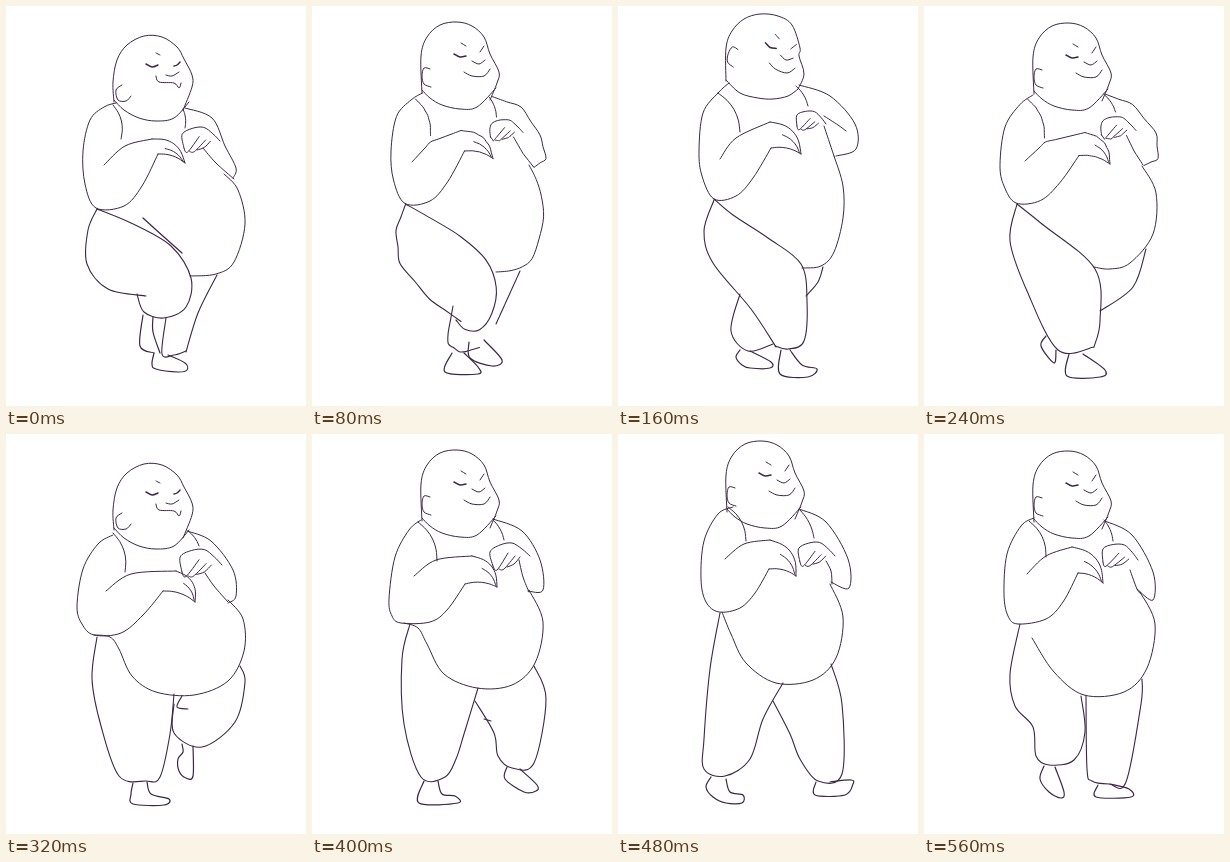
Recreate the animation shown at these times as an HTML page with a canvas. Size 300 px wide and 400 px high, loop 640 ms.

```html
<!DOCTYPE html>
<html lang="en">
<head>
<meta charset="utf-8">
<title>Walk cycle</title>
<style>
html, body { margin: 0; width: 100%; height: 100%; overflow: hidden; background: #fff; }
canvas { display: block; width: 300px; height: 400px; }
</style>
</head>
<body>
<canvas id="stage" width="300" height="400"></canvas>
<script>
const ctx = document.getElementById("stage").getContext("2d");
const STEP = 80;
const INK = "#3c2647";

// Strokes are separated by "/", each one a run of x,y points.
const strokes = text => text.split("/").map(run =>
  run.trim().split(/\s+/).map(point => point.split(",").map(Number)));

// Curve from a to b, bulging by a share of its length.
const arc = (a, b, bow) => {
  const dx = b[0] - a[0], dy = b[1] - a[1];
  return [0, .25, .5, .75, 1].map(u => {
    const k = 4 * u * (1 - u) * bow;
    return [a[0] + dx * u + dy * k, a[1] + dy * u - dx * k];
  });
};

const blend = (p, q, k) => p.map((v, i) => v + (q[i] - v) * k);

function pointAt(line, u) {
  const x = u * (line.length - 1), i = Math.min(Math.floor(x), line.length - 2);
  return blend(line[i], line[i + 1], x - i);
}

// Halfway shape of two stroke sets.
const between = (a, b) => a.map((line, i) => Array.from({ length: 9 }, (_, j) =>
  blend(pointAt(line, j / 8), pointAt(b[i], j / 8), .5)));

const place = (lines, dx, dy, degrees = 0) => {
  const c = Math.cos(degrees * Math.PI / 180), s = Math.sin(degrees * Math.PI / 180);
  return lines.map(line => line.map(([x, y]) => {
    const u = x - 147, v = y - 55;
    return [147 + dx + u * c - v * s, 55 + dy + u * s + v * c];
  }));
};

const fist = strokes(`0,0 -3,-14 7,-21 19,-23 29,-17 37,-10
  / 0,0 4,4 15,-13 / 6,3 11,3 22,-10 / 14,1 21,-2 27,-9`);

// Turns and scales the fist so that it spans a to b.
function farHand([a, b]) {
  const d = 37 * 37 + 100, dx = b[0] - a[0], dy = b[1] - a[1];
  const c = (dx * 37 - dy * 10) / d, s = (dy * 37 + dx * 10) / d;
  return fist.map(line => line.map(([x, y]) => [a[0] + x * c - y * s, a[1] + x * s + y * c]));
}

function nearHand(wrist, tip, heel) {
  const along = k => blend(wrist, tip, k);
  return [arc(wrist, tip, .22), arc(heel, tip, .1), arc(along(.4), along(.95), .12)];
}

// Arm strokes: near arm, near forearm, far arm, far forearm, any extra.
function upper(arms, straps, tip, grip) {
  const lines = strokes(arms), [near, far] = strokes(straps);
  const heel = lines[0].at(-1), wrist = lines[1].at(-1);
  return [arc(...near, .13), arc(...far, .08),
    ...nearHand(wrist, tip, heel), ...farHand(strokes(grip)[0]), ...lines];
}

const lowHead = strokes(`108,96 107,76 111,54 121,39 138,30 156,31 171,41 178,53 186,69 186,81 177,104
  / 108,94 118,104 133,112 150,115 168,112 183,96
  / 116,79 110,84 112,94 120,95 125,90 / 150,47 154,49
  / 160,69 166,70 173,66 / 150,70 153,76 168,77 173,82 175,77`);
const lowEyes = strokes("140,58 146,61 152,59 / 168,60 171,59 174,56");

const skull = strokes(`110,87 109,50 115,31 128,19 145,16 160,20 172,31 178,48 187,66 185,77 178,94
  / 110,84 118,92 130,99 148,103 165,101 184,82`);
const turnedSkull = strokes(`108,75 108,42 114,25 126,13 142,8 160,10 174,19 182,42 181,50 186,68 180,83
  / 108,74 122,87 140,92 155,93 170,90 180,83`);
const face = strokes(`118,63 112,62 110,70 112,78 119,81 / 149,37 154,40 / 168,46 172,40
  / 160,55 167,58 173,54 / 152,66 160,70 172,70 178,63`);
const smallEye = strokes("142,48 148,51 154,50");

const headAt = (dx, dy) => ({ head: place([...skull, ...face], dx, dy), eyes: place(smallEye, dx, dy) });
const low = { head: lowHead, eyes: lowEyes };

const drop = {
  ...low,
  arms: upper(`110,97 98,101 84,114 77,145 79,178 90,202 118,200 136,180 152,148
    / 98,159 119,140 146,133
    / 179,102 206,112 219,140 230,162 227,172 / 197,142 210,157 228,173`,
    "107,99 115,133 / 177,103 179,122", [179, 157], "178,142 214,135"),
  body: strokes("218,168 232,184 239,218 228,256 210,268 184,270"),
  legs: strokes(`91,203 82,224 81,258 102,283 140,290
    / 91,203 125,217 165,240 185,272 180,301 158,312 138,306 131,288
    / 211,269 192,307 180,346
    / 160,312 156,348 168,349 180,345`),
  feet: strokes(`137,309 134,340 148,347 / 148,347 146,358 150,363 172,366 181,364 179,357 162,349
    / 147,311 147,326 154,347 / 137,212 158,231 176,247`)
};

const cross = {
  head: [...turnedSkull, ...place(face, 3, -10, 18)],
  eyes: place(smallEye, 3, -10, 18),
  arms: upper(`111,77 100,87 85,107 81,145 84,170 96,193 118,190 135,172 153,142
    / 102,153 118,132 152,116
    / 181,79 212,90 237,118 238,143 218,150 / 206,120 212,138 216,150 / 206,110 220,119 228,125`,
    "100,87 122,126 / 178,80 190,100", [183, 148], "179,120 208,118"),
  body: strokes("216,150 225,180 225,212 216,246 203,260 184,262"),
  legs: strokes(`96,194 86,225 95,257 133,303 158,341
    / 96,193 115,209 150,232 183,258 189,295 186,335 170,343 157,340
    / 205,261 200,276 188,290
    / 122,288 113,325 130,345 155,338`),
  feet: strokes(`163,344 162,368 190,371 199,363 184,359 172,344
    / 122,344 118,351 124,359 132,362 152,362 153,356 132,345`)
};

const tread = {
  ...low,
  arms: upper(`107,101 92,110 77,135 71,172 76,190 88,201 115,199 137,181 157,157
    / 100,157 125,140 170,137
    / 181,97 205,107 227,136 230,162 222,169 / 199,139 208,152 222,168`,
    "107,99 119,138 / 182,97 193,112", [189, 168], "176,138 216,131"),
  body: strokes("222,166 237,185 238,217 222,247 188,261 150,258 126,242 113,215 104,203 88,201"),
  legs: strokes(`91,203 86,245 95,292 113,342 140,347 154,343 164,300 168,260
    / 234,232 239,248 229,288 196,313 168,299 168,270
    / 176,262 171,273 182,275`),
  feet: strokes(`176,310 177,318 172,325 173,337 180,344 187,342 187,312
    / 127,349 125,360 127,370 158,371 163,365 145,360 141,348`)
};

const rise = {
  ...headAt(0, 0),
  arms: upper(`109,86 97,96 83,123 77,165 80,182 89,189 118,188 135,176 153,150
    / 102,142 124,126 160,122
    / 181,85 210,97 228,126 231,156 216,157 / 207,126 211,143 217,158`,
    "106,88 125,127 / 181,86 192,106", [185, 153], "181,132 218,122"),
  body: strokes("217,156 231,188 223,229 200,251 165,254 132,240 115,210 106,194 92,189"),
  legs: strokes(`98,190 90,225 92,290 109,343 133,343 144,325 152,300 166,254
    / 222,232 234,265 222,329 200,334 186,322 182,299 163,267
    / 172,285 179,287`),
  feet: strokes(`112,347 107,369 146,369 143,362 130,360 126,347
    / 195,333 193,345 212,358 224,357 225,351 208,335`)
};

const reach = {
  ...headAt(-1, -9),
  arms: upper(`115,73 100,80 86,107 83,145 88,168 101,178 122,174 137,159 151,135
    / 107,125 126,110 152,106
    / 181,75 208,88 230,125 231,154 213,148 / 208,127 213,137 214,150`,
    "110,73 128,107 / 182,76 196,104", [178, 142], "182,128 217,122"),
  body: strokes("212,150 225,183 218,224 195,246 158,249 128,229 113,200 104,178"),
  legs: strokes(`102,179 92,235 86,305 86,335 107,342 132,325 145,285 165,249
    / 213,230 224,270 224,340 200,347 182,325 172,300 155,267`),
  feet: strokes(`93,343 88,353 95,363 108,369 124,369 125,361 112,358 108,345
    / 198,348 197,361 227,361 235,350 233,346 212,348`)
};

const lift = {
  ...headAt(0, 1),
  arms: upper(`110,84 97,92 83,120 80,160 84,182 94,190 122,185 139,168 154,139
    / 103,140 122,122 148,113
    / 181,87 208,101 229,138 229,166 213,155 / 206,136 213,155 217,160`,
    "105,87 122,123 / 180,86 189,107", [179, 149], "179,128 214,126"),
  body: strokes("216,158 231,190 223,234 200,258 160,261 130,238 108,204"),
  legs: strokes(`96,190 86,240 91,272 109,293 112,322 125,331 150,326 161,298 157,262
    / 218,245 217,270 202,348 185,350 168,347 163,335 162,262`),
  feet: strokes(`120,332 116,345 125,358 137,364 140,358 131,333
    / 174,351 172,363 207,363 205,355 186,350`)
};

const swing = {
  ...headAt(0, 0),
  arms: between(drop.arms, cross.arms),
  body: between(drop.body, cross.body),
  legs: between(drop.legs, cross.legs),
  feet: strokes(`157,336 158,352 180,360 190,354 172,334
    / 140,347 133,366 166,368 166,361 152,347`)
};

const plant = {
  ...headAt(0, 1),
  arms: between(tread.arms, cross.arms),
  body: strokes("218,160 232,187 229,228 206,257 186,263 170,261"),
  legs: strokes(`93,198 86,235 103,285 134,344 170,341
    / 93,198 118,218 171,263 176,315 170,341 / 222,243 209,281 176,305`),
  feet: strokes(`145,348 143,370 176,371 181,364 159,348
    / 122,330 117,340 130,357 132,344`)
};

const cycle = [drop, swing, cross, plant, tread, rise, reach, lift];
const weights = { head: 1, eyes: 1.5, arms: 1, body: 1, legs: 1.1, feet: 1.2 };

function trace(line) {
  ctx.beginPath();
  ctx.moveTo(...line[0]);
  for (let i = 0; i < line.length - 1; i++) {
    const p = line[i], q = line[i + 1], before = line[i - 1] || p, after = line[i + 2] || q;
    ctx.bezierCurveTo(
      p[0] + (q[0] - before[0]) / 6, p[1] + (q[1] - before[1]) / 6,
      q[0] - (after[0] - p[0]) / 6, q[1] - (after[1] - p[1]) / 6,
      q[0], q[1]);
  }
  ctx.stroke();
}

function draw(time) {
  const pose = cycle[Math.floor(time / STEP) % cycle.length];
  ctx.fillStyle = "#fff";
  ctx.fillRect(0, 0, 300, 400);
  ctx.strokeStyle = INK;
  ctx.lineCap = ctx.lineJoin = "round";
  for (const part in weights) {
    ctx.lineWidth = weights[part];
    pose[part].forEach(trace);
  }
}

const start = performance.now();
function tick() {
  draw(performance.now() - start);
  requestAnimationFrame(tick);
}
tick();
</script>
</body>
</html>
```
